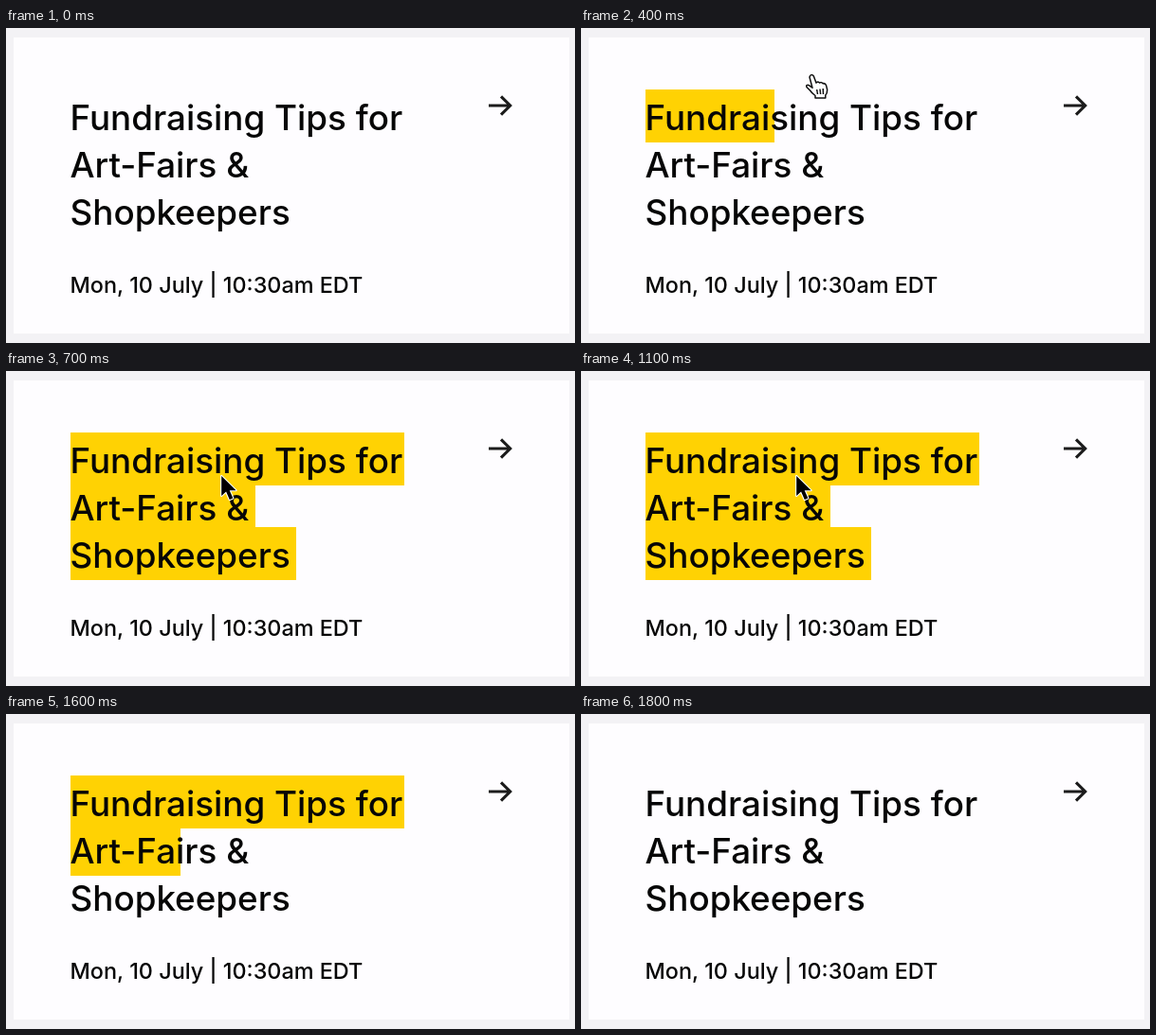
An HTML page for the animation above (2900 ms loop, 600 px wide and 333 px high).

```html
<!DOCTYPE html>
<html lang="en">
<head>
<meta charset="utf-8">
<title>Event card</title>
<style>
  html, body { margin: 0; width: 100%; height: 100%; overflow: hidden; background: #f3f2f5; }
  svg { display: block; width: 600px; height: 333px; }
  text { font-family: Inter, "Open Sans", sans-serif; font-weight: 500; fill: #060606; }
  .title { font-size: 36.8px; }
  .date { font-size: 23.4px; }
  .mark { fill: #ffd203; }
</style>
</head>
<body>
<svg viewBox="0 0 600 333">
  <rect x="8" y="10" width="586" height="313" fill="#fefdff"/>
  <rect class="mark" x="68" y="65" height="56"/>
  <rect class="mark" x="68" y="115" height="56"/>
  <rect class="mark" x="68" y="165" height="56"/>
  <g class="title">
    <text x="67.5" y="108">Fundraising Tips for</text>
    <text x="67.5" y="158">Art-Fairs &amp;</text>
    <text x="67.5" y="208">Shopkeepers</text>
  </g>
  <text class="date" x="67.5" y="280">Mon, 10 July | 10:30am EDT</text>
  <path d="M509 82H531.6M522 72.3L531.7 82L522 91.7" fill="none" stroke="#1c1c1c" stroke-width="3.1"/>
  <g id="cursor" stroke-linejoin="round">
    <path id="arrow" d="M1.2 2V23L6.1 18.5L9.8 27L13.4 25.4L9.7 17.2H16.6Z"
      fill="#000" stroke="#fff" stroke-width="2.2" paint-order="stroke"/>
    <g id="hand" stroke="#111" stroke-width="1.5">
      <path fill="#fff" d="M-1 3Q0 -1 3.2 1.5L6 9Q7.7 7.2 9.6 9Q11.5 7.6 13.2 9.8Q15.6 9 16.6 11.8L17.6 16Q17.8 20 15.8 22V25H5V22.5Q1.5 20 -.5 17L-4 13.5Q-5 10.8 -2 11.4L2 14.2Z"/>
      <path fill="none" d="M6.7 16L7.5 21M10 15.5L10.6 21M13.2 15L13.5 21"/>
    </g>
  </g>
</svg>
<script>
  const LOOP = 2900, STEP = 100, FADE = 250;
  const ENTER = 364, LEAVE = 1538;
  const widths = [352, 195, 238];
  const total = widths.reduce((a, b) => a + b);
  // time, x, y of the pointer tip
  const path = [
    [300, 254, -8], [400, 242, 49], [500, 232, 85], [600, 227, 105],
    [700, 226, 109], [1100, 226, 109], [1200, 228, 106], [1300, 236, 92],
    [1400, 252, 55], [1500, 274, -9]
  ];

  const marks = document.querySelectorAll('.mark');
  const [cursor, arrow, hand] = ['cursor', 'arrow', 'hand'].map(id => document.getElementById(id));
  const clamp = v => Math.min(1, Math.max(0, v));
  const show = (el, on) => el.setAttribute('visibility', on ? 'visible' : 'hidden');

  // cubic-bezier(.25, .1, .25, 1)
  function ease(x) {
    let lo = 0, hi = 1;
    for (let i = 0; i < 24; i++) {
      const s = (lo + hi) / 2;
      if (0.75 * s * (1 - s) + s ** 3 < x) lo = s; else hi = s;
    }
    const s = hi, r = 1 - s;
    return 0.3 * r * r * s + 3 * r * s * s + s ** 3;
  }

  function tip(t) {
    const i = path.findIndex(p => p[0] >= t);
    if (i < 1) return path[0].slice(1);
    const [t0, x0, y0] = path[i - 1], [t1, x1, y1] = path[i];
    const k = (t - t0) / (t1 - t0);
    return [x0 + (x1 - x0) * k, y0 + (y1 - y0) * k];
  }

  function draw(t) {
    const progress = ease(clamp((t - ENTER) / FADE)) - ease(clamp((t - LEAVE) / FADE));
    let left = progress * total;
    marks.forEach((m, i) => {
      m.setAttribute('width', Math.round(Math.min(widths[i], Math.max(0, left))));
      left -= widths[i];
    });

    const visible = t >= 300 && t <= 1500, pointing = t === 400;
    show(arrow, visible && !pointing);
    show(hand, visible && pointing);
    if (visible) cursor.setAttribute('transform', `translate(${tip(t)})`);
  }

  const start = performance.now();
  function tick() {
    const t = (performance.now() - start) % LOOP;
    draw(Math.floor(t / STEP) * STEP);
    requestAnimationFrame(tick);
  }
  tick();
</script>
</body>
</html>
```
